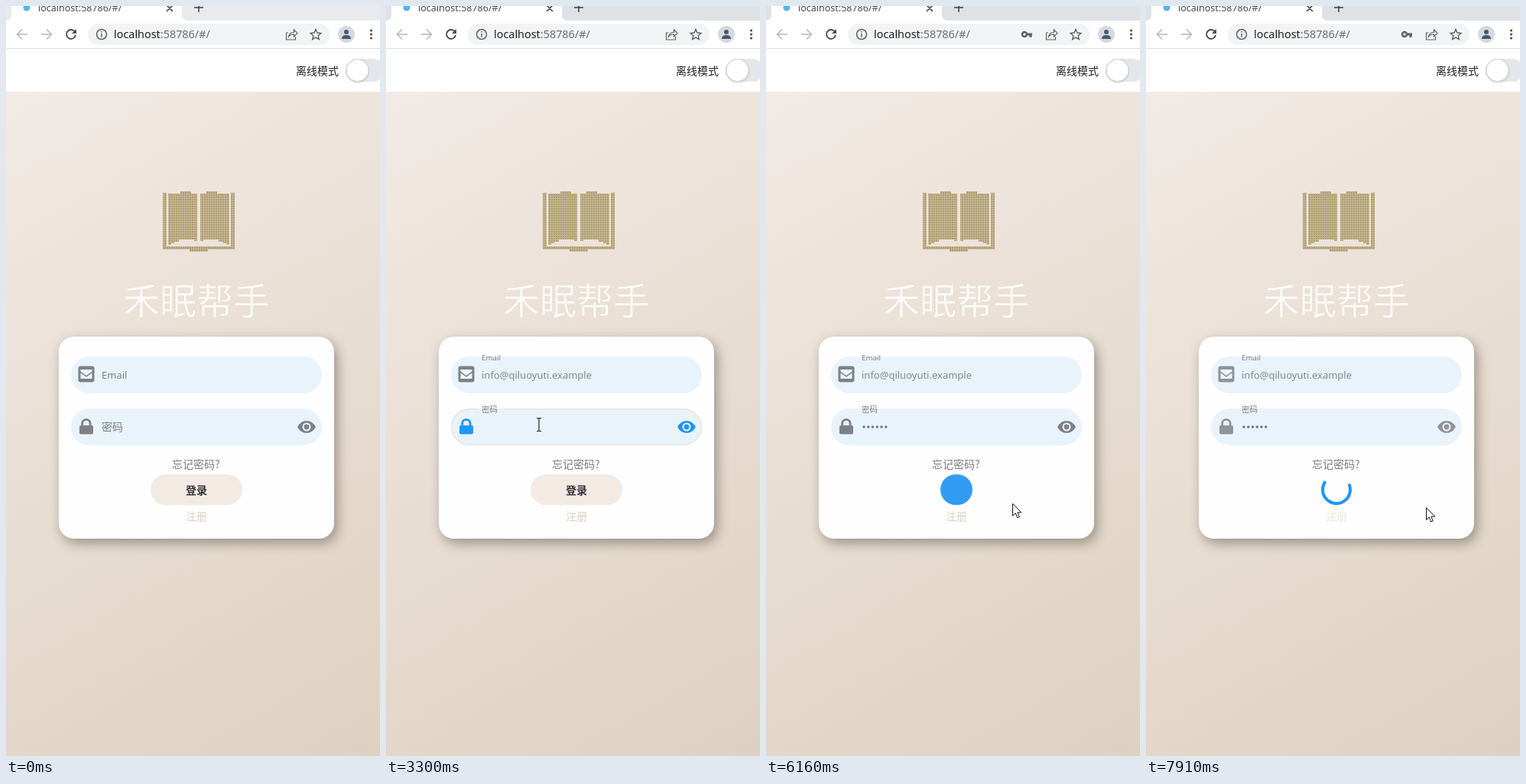
These frames come from a looping animation (489x980 px, 7.99 s). An HTML page:

```html
<!DOCTYPE html>
<html lang="zh-CN">
<head>
<meta charset="utf-8">
<title>登录</title>
<style>
html, body { margin: 0; width: 100%; height: 100%; overflow: hidden; background: #fff; }
svg { display: block; }
text { font-family: "Noto Sans", "Noto Sans CJK SC", "Noto Sans CJK", sans-serif; white-space: pre; }
.zh { font-family: "Noto Sans CJK SC", "Noto Sans CJK", sans-serif; font-size: 14px; }
.latin { font-size: 13px; }
.line { fill: none; stroke: #5f6368; stroke-width: 1.5; }
.icon { fill: var(--c); }
</style>
</head>
<body>
<svg width="489" height="980" viewBox="0 0 489 980">
  <defs>
    <linearGradient id="bg" gradientUnits="userSpaceOnUse" x1="0" y1="112" x2="489" y2="980">
      <stop offset="0" stop-color="#f2eae5"/><stop offset="1" stop-color="#ded1c0"/>
    </linearGradient>
    <pattern id="weave" width="3" height="3" patternUnits="userSpaceOnUse">
      <rect width="3" height="3" fill="#c4b89c"/><rect width="2" height="2" fill="#b09a66"/>
    </pattern>
    <filter id="cardShadow" x="-12%" y="-12%" width="130%" height="135%" color-interpolation-filters="sRGB">
      <feDropShadow dx="4" dy="6" stdDeviation="8" flood-color="#3c352c" flood-opacity=".45"/>
    </filter>
    <filter id="softShadow" x="-30%" y="-30%" width="160%" height="160%">
      <feDropShadow dx="0" dy="1" stdDeviation="1.2" flood-color="#444" flood-opacity=".3"/>
    </filter>
  </defs>

  <!-- browser -->
  <rect id="strip" width="489" height="20"/>
  <path d="M0 19Q7 19 7 11V0H230V11Q230 19 238 19Z" fill="#fff"/>
  <circle cx="27" cy="2" r="4.5" fill="#54b5e8"/>
  <text x="42" y="7" font-size="12.5" fill="#45494d">localhost:58786/#/</text>
  <path class="line" d="M210-1l8 8M218-1l-8 8M246 2h12M252-4V8" style="stroke:#3c4043"/>
  <rect y="19" width="489" height="93" fill="#fff"/>
  <rect y="55" width="489" height="1" fill="#dadce0"/>
  <path class="line" d="M28 37H15M21 30.5L14.5 37l6.500 6.500M46 37h13M53 30.500L59.500 37 53 43.500" style="stroke:#b4b7bb"/>
  <path class="line" d="M90 33.500a6 6 0 1 0 1 4.500" style="stroke:#4a4d51;stroke-width:1.900"/>
  <path d="M92 30v6h-6z" fill="#4a4d51"/>
  <rect x="107" y="23" width="316" height="28" rx="14" fill="#f1f3f4"/>
  <circle class="line" cx="125" cy="37" r="6.500"/>
  <path class="line" d="M125 36v4.500M125 33v1.600"/>
  <text x="141" y="42" font-size="14.4" fill="#202124">localhost<tspan fill="#686c70">:58786/#/</tspan></text>
  <g id="key">
    <path class="line" d="M341.500 37H348M346 37v4" style="stroke-width:3"/>
    <circle class="line" cx="338" cy="37" r="3" style="stroke-width:2.600"/>
  </g>
  <path class="line" d="M369 35h-2.500v9h12v-4M369.500 40q1-5.500 7-5.500V31l4.500 4.500-4.500 4.500v-3q-4.500 0-7 3z" style="stroke-width:1.200"/>
  <path class="line" d="M405 30.500l2 4.500 4.900.5-3.700 3.300 1.100 4.800-4.300-2.500-4.300 2.500 1.100-4.800-3.700-3.300 4.900-.5z" style="stroke-width:1.400"/>
  <circle cx="445" cy="37" r="11" fill="#d5dae0"/>
  <path d="M439 43q0-5 6-5t6 5z" fill="#47586c"/><circle cx="445" cy="34" r="3" fill="#47586c"/>
  <g fill="#4a4d51"><circle cx="477.500" cy="32" r="1.600"/><circle cx="477.500" cy="37" r="1.600"/><circle cx="477.500" cy="42" r="1.600"/></g>

  <!-- page -->
  <text class="zh" x="379" y="90" fill="#222">离线模式</text>
  <rect x="444" y="69" width="50" height="30" rx="15" fill="#e4e7ea"/>
  <circle cx="459.500" cy="84" r="14.500" fill="#fff" stroke="#cdd1d5" filter="url(#softShadow)"/>
  <rect y="112" width="489" height="868" fill="url(#bg)"/>
  <g fill="url(#weave)">
    <path d="M205 244h5v70h84v-70h5v74h-35v3h-24v-3h-35z"/>
    <path id="leaf" d="M212 245h16v-3h14v3h8v62h-4v-2h-20v3h-6v2h-4v2h-4z"/>
    <use href="#leaf" transform="matrix(-1 0 0 1 504 0)"/>
  </g>
  <!-- the background-coloured outline thins the strokes to a light weight -->
  <text class="zh" x="153" y="403" fill="#fff" stroke="url(#bg)" style="font-size:48px;font-weight:300">禾眠帮手</text>

  <rect x="69" y="432" width="360" height="264" rx="20" fill="#fefefe" filter="url(#cardShadow)"/>
  <g id="fields"></g>
  <text class="zh" x="217" y="604" fill="#7c7c7c">忘记密码?</text>
  <text class="zh" id="signup" x="235" y="672">注册</text>

  <path id="arc" fill="none" stroke="#2196f3" stroke-width="4"/>
  <circle id="ring" cx="249" cy="632" fill="none" stroke="#2196f3"/>
  <rect id="pill" y="612" height="40" rx="20"/>
  <text class="zh" id="login" x="235" y="637.500" fill="#333338" font-weight="700">登录</text>

  <!-- pointer -->
  <circle id="glow" r="12.500" fill="#f1ee3c" opacity=".75"/>
  <g id="pointer">
    <path id="beam" d="M-3-8.500h2.500l.5.500.5-.5H3M0-8V8M-3 8.500h2.500L0 8l.5.500H3" fill="none" stroke="#222" stroke-width="1.200"/>
    <path id="arrow" d="M.5.5v16l3.700-3.500 2.500 6 2.600-1.100-2.500-5.800h5z" fill="#fff" stroke="#111"/>
    <path id="hand" d="M0 1.500q0-2 1.700-2t1.700 2V8q3-1 3.400 1 2.600-.8 3 1 2.300-.2 2.300 2v4q0 3-2 5v3H2v-3q-2-2-3.500-5L-4 12.500q0-2.500 2.300-1.500L0 13zM6.800 9v3M9.800 10v3M3.400 8v3.500" fill="#fff" stroke="#111" stroke-width="1.100"/>
  </g>
</svg>
<script>
const LOOP = 7990, SUBMIT = 5790;
const GREY = [125, 129, 133], PALE = [143, 148, 153], BLUE = [33, 150, 243];
const $ = id => document.getElementById(id);
const set = (id, attrs) => { for (const k in attrs) $(id).setAttribute(k, attrs[k]); };
const show = (id, on) => set(id, { visibility: on ? 'visible' : 'hidden' });
const clamp = v => Math.min(1, Math.max(0, v));
const ramp = (t, a, b) => clamp((t - a) / (b - a));
const lerp = (a, b, k) => a + (b - a) * k;
const mix = (a, b, k) => a.map((v, i) => lerp(v, b[i], k));
const rgb = c => `rgb(${c.map(Math.round)})`;
const within = (t, a, b) => t >= a && t < b;

// cubic-bezier(.4, 0, .2, 1)
function ease(x) {
  let lo = 0, hi = 1;
  for (let i = 0; i < 18; i++) {
    const s = (lo + hi) / 2, r = 1 - s;
    if (1.2 * r * r * s + .6 * r * s * s + s ** 3 < x) lo = s; else hi = s;
  }
  return 3 * (1 - lo) * lo * lo + lo ** 3;
}

function field(id, y, label, font, icon, extra) {
  return `<g transform="translate(85 ${y})">
    <rect id="${id}Fill" width="328" height="48" rx="24"/>
    <path id="${id}Edge" d="M69 .7H304a23.300 23.300 0 0 1 0 46.600H24a23.300 23.300 0 0 1 0-46.600h12" fill="none" stroke="#e7e4e0" stroke-width="1.400"/>
    <g id="${id}Icon" class="icon">${icon}</g>
    <text id="${id}Label" class="${font}" fill="#7c7f82">${label}</text>
    ${extra}
    <rect id="${id}Caret" y="15.500" width="1.300" height="17" fill="#d3cdc6"/>
  </g>`;
}
const envelope = `<rect x="9.500" y="12.500" width="21" height="21" rx="3"/>
  <path d="M12.500 17h15v2.500l-7.500 5.500-7.500-5.500zM12.500 21.500l7.500 5.300 7.500-5.300V29h-15z" fill="#eef6fd"/>`;
const lockAndEye = `<rect x="11" y="22" width="18" height="11.500" rx="2"/>
  <path d="M14.700 23v-3.500a5.200 5.200 0 0 1 10.400 0V23" fill="none" stroke="var(--c)" stroke-width="2.800"/>
  <path d="M296 24q4.500-8 12-8t12 8q-4.500 8-12 8t-12-8z"/>
  <circle cx="308" cy="24" r="5.500" fill="#eef6fd"/><circle cx="308" cy="24" r="3.400"/>`;
const dots = Array.from({ length: 6 }, (_, i) =>
  `<circle id="dot${i}" cx="${43 + 5.75 * i}" cy="24" r="1.800" fill="#777a7d"/>`).join('');
$('fields').innerHTML =
  field('mail', 458, 'Email', 'latin', envelope,
    '<text id="address" class="latin" x="40" y="29" fill="#858789">info@qiluoyuti.example</text>') +
  field('pass', 526, '密码', 'zh', lockAndEye, dots);

const typedAt = [3770, 4000, 4240, 4450, 4770, 5000];
const path = [
  [440, 476, 910], [600, 405, 800], [800, 275, 610], [980, 185, 495], [1140, 171, 481],
  [2140, 171, 481], [2450, 207, 542], [2700, 200, 547], [5060, 200, 547], [5230, 269, 614],
  [5480, 261, 632], [5860, 261, 632], [6200, 330, 652], [6540, 366, 657], [7300, 366, 657], [7600, 366, 655]
];
function pointerAt(t) {
  let i = 0;
  while (i < path.length - 2 && t > path[i + 1][0]) i++;
  const [a, ...p] = path[i], [b, ...q] = path[i + 1];
  return mix(p, q, ramp(t, a, b));
}

function drawField(id, f) {
  set(id + 'Fill', { fill: rgb(mix([233, 243, 252], [225, 233, 240], f.hover)) });
  set(id + 'Edge', { opacity: f.edge });
  $(id + 'Icon').style.setProperty('--c', rgb(f.color));
  set(id + 'Label', { transform: `translate(40 ${lerp(29, 4.5, f.float)}) scale(${lerp(1, .75, f.float)})` });
  show(id + 'Caret', f.caret);
}

function drawPointer(t) {
  const [x, y] = pointerAt(t);
  const inField = x > 85 && x < 413 && (Math.abs(y - 482) < 24 || Math.abs(y - 550) < 24);
  const onLink = within(t, 5060, SUBMIT + 120) && y > 590;
  const kind = inField ? 'beam' : onLink ? 'hand' : 'arrow';
  const on = within(t, 440, 3440) || t >= 5060;
  for (const k of ['beam', 'hand', 'arrow']) show(k, on && k === kind);
  set('pointer', { transform: `translate(${x} ${y})` });
  set('glow', { cx: x - 1, cy: y });
  show('glow', within(t, 1140, 1380) || within(t, 2700, 2920) || within(t, 5690, 5880));
}

function drawButton(t) {
  const width = lerp(120, 40, ease(ramp(t, SUBMIT, 6250)));
  const base = mix([242, 234, 227], [232, 224, 216], ramp(t, 5400, 5500));
  set('pill', { x: 249 - width / 2, width, fill: rgb(mix(base, BLUE, ease(ramp(t, SUBMIT, 6350)))) });
  set('login', { opacity: 1 - ramp(t, SUBMIT, 6050) });
  show('pill', t < 6350);
  show('login', t < 6350);
  const thick = lerp(20, 4, ease(ramp(t, 6350, 6620)));
  set('ring', { r: 20 - thick / 2, 'stroke-width': thick, opacity: 1 - ramp(t, 6710, 6860) });
  show('ring', t >= 6350);

  const age = Math.max(0, t - SUBMIT), phase = age / 1333 % 1;
  const head = ease(clamp(phase * 2)), tail = ease(clamp(phase * 2 - 1));
  const from = -Math.PI / 2 + Math.PI * (1.5 * tail + 2 * age / 2222 + .5 * phase);
  const sweep = Math.max(.01, 1.5 * Math.PI * (head - tail));
  const at = a => `${249 + 18 * Math.cos(a)} ${632 + 18 * Math.sin(a)}`;
  set('arc', { d: `M${at(from)}A18 18 0 ${+(sweep > Math.PI)} 1 ${at(from + sweep)}` });
  show('arc', t >= 6350);
}

function draw(t) {
  set('strip', { fill: t < 1140 ? '#e8eaed' : '#dee1e6' });
  show('key', t >= 4000);
  const rest = mix(GREY, PALE, ramp(t, 6720, 7200));

  drawField('mail', {
    hover: ramp(t, 990, 1100) - ramp(t, 1300, 1450),
    edge: ramp(t, 1300, 1450) - ramp(t, 2760, 2920),
    float: ease(ramp(t, 1300, 1480)),
    color: mix(rest, BLUE, ramp(t, 1300, 1400) - ramp(t, 2760, 2860)),
    caret: within(t, 1380, 1840) || within(t, 2140, 2760)
  });
  show('address', t >= 2140);
  set('mailCaret', { x: t < 2140 ? 40.5 : 183.5 });

  const typed = typedAt.filter(k => t >= k).length;
  drawField('pass', {
    hover: ramp(t, 2300, 2400) - ramp(t, 2760, 2900),
    edge: ramp(t, 2760, 2900) - ramp(t, 5770, 5950),
    float: ease(ramp(t, 2760, 2940)),
    color: mix(rest, BLUE, ramp(t, 2760, 2860) - ramp(t, 5690, 5770)),
    caret: within(t, 2840, 3150) || within(t, 3450, 5390)
  });
  typedAt.forEach((k, i) => show('dot' + i, t >= k));
  set('passCaret', { x: 40.5 + 5.75 * typed });
  set('signup', { fill: rgb(mix([222, 209, 194], [235, 230, 221], ramp(t, 6720, 7200))) });
  drawButton(t);
  drawPointer(t);
}

const start = performance.now();
function tick() {
  draw((performance.now() - start) % LOOP);
  requestAnimationFrame(tick);
}
tick();
</script>
</body>
</html>
```
